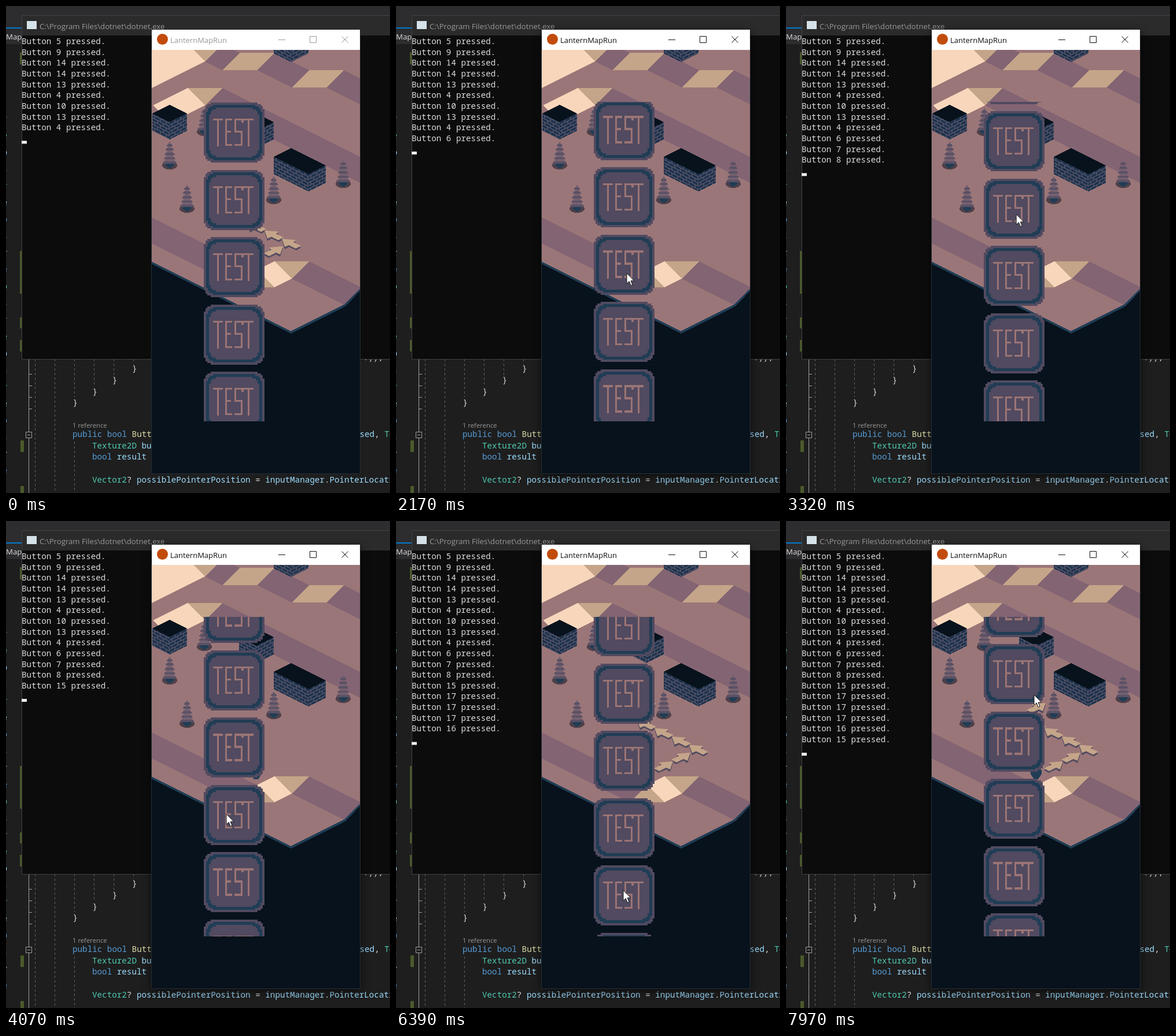
Recreate the animation shown at these times as an HTML page. Size 664 px wide and 843 px high, loop 7990 ms.

```html
<!DOCTYPE html>
<html lang="en">
<head>
<meta charset="utf-8">
<title>Scrolling button list</title>
<style>
  html, body { margin: 0; width: 100%; height: 100%; overflow: hidden; background: #1e1e1e; }
  svg { display: block; width: 664px; height: 843px; }
  text { white-space: pre; font: 14.25px "Noto Sans Mono", monospace; fill: #dcdcdc; }
  .ui { font-family: "Open Sans", sans-serif; font-size: 13.2px; }
  .kw { fill: #569cd6; }
  .type { fill: #4ec9b0; }
  .var { fill: #9cdcfe; }
  .fn { fill: #dcdcaa; }
  #terrain, #props, #list { shape-rendering: crispEdges; }
  .cream { fill: #f7d6bb; }
  .tan { fill: #c4a589; }
  .band { fill: #836473; }
  .navy { fill: #07121c; }
  .blue { fill: #203d55; }
  .slate { fill: #514a60; }
  .brick { fill: #18304a; }
  .mortar { stroke: #5f586c; stroke-width: 1.5; }
  #chrome { stroke: currentColor; fill: none; }
  #window { animation: activate 7990ms step-end infinite; }
  #shadow { filter: drop-shadow(0 4px 8px #000a); }
  #shadow, #pointer { animation: show 7990ms step-end infinite; }
  #oldTrail { animation: hide 7990ms step-end infinite; }
  #newTrail { animation: trail 7990ms step-end infinite; }
  @keyframes activate { 0% { color: #999; } 5.2%, 100% { color: #111; } }
  @keyframes show { 0% { opacity: 0; } 5.2%, 100% { opacity: 1; } }
  @keyframes hide { 0% { opacity: 1; } 5.2%, 100% { opacity: 0; } }
  @keyframes trail { 0% { opacity: 0; } 70.2%, 100% { opacity: 1; } }
</style>
</head>
<body>
<svg viewBox="0 0 664 843">
  <defs>
    <g id="brick">
      <path class="brick" d="M0 0H10V11H0Z"/>
      <path class="mortar" d="M0 1H10M0 6.5H10M2 1V6.5M7 6.5V11"/>
    </g>
    <pattern id="brickL" width="10" height="11" patternUnits="userSpaceOnUse" patternTransform="skewY(26.57)"><use href="#brick"/></pattern>
    <pattern id="brickR" width="10" height="11" patternUnits="userSpaceOnUse" patternTransform="skewY(-26.57)"><use href="#brick"/></pattern>
    <clipPath id="view"><path d="M252 76H612V809H252Z"/></clipPath>
    <clipPath id="listView"><path d="M341 166H448V719H341Z"/></clipPath>
    <g id="tree"></g>
    <g id="arrow">
      <path class="slate" d="M-16-6L8-4 5 0 17 6 9 11-4 5-11 9Z"/>
      <path class="tan" d="M-16-9L8-7 4-3 17 3 8 8-4 2-11 5Z"/>
    </g>
    <g id="button"></g>
  </defs>

  <g id="editor">
    <path fill="#1e1e1e" d="M0 0H664V843H0Z"/>
    <path fill="#2d2d30" d="M0 0H664V66H0Z"/>
    <path fill="#007acc" d="M0 37H27V39H0Z"/>
    <text class="ui" x="-8" y="58">nMap</text>
    <path fill="#4b5a2b" d="M24 80h3v21h-3ZM24 424h3v74h-3ZM24 539h3v19h-3ZM24 578h3v20h-3ZM25 752h6v20h-6ZM25 831h6v12h-6Z"/>
    <g id="fragments"></g>
    <path d="M39.5 611V737M39.5 748V843M34.5 737.5h10v10h-10ZM37 742.5h5" fill="none" stroke="#a0a0a0"/>
    <g id="guides" stroke="#626262" stroke-dasharray="4 4"></g>
    <text x="618" y="613">.));</text>
    <text class="ui" x="115" y="730" style="font-size:11.3px;fill:#9a9a9a">1 reference</text>
    <text x="115" y="746"><tspan class="kw">public bool </tspan><tspan class="fn">Button</tspan></text>
    <text x="611.5" y="746"><tspan class="var">sed</tspan>, <tspan class="type">Te</tspan></text>
    <text x="149" y="766"><tspan class="type">Texture2D </tspan><tspan class="var">button</tspan></text>
    <text x="149" y="785"><tspan class="kw">bool </tspan><tspan class="var">result</tspan></text>
    <text x="149" y="825"><tspan class="type">Vector2</tspan>? <tspan class="var">possiblePointerPosition</tspan> = <tspan class="var">inputManager</tspan>.<tspan class="var">PointerLocation</tspan></text>
  </g>

  <g id="console">
    <path fill="#0c0c0c" stroke="#424242" d="M27.5 16.5H670V611.5H27.5Z"/>
    <path fill="#2b2b2b" d="M28 17H664V51H28Z"/>
    <path fill="#d5e2e8" d="M36 26H53V40H36Z"/>
    <text class="ui" x="58" y="40" style="fill:#999">C:\Program Files\dotnet\dotnet.exe</text>
    <g id="log"></g>
    <path id="caret" fill="#f2f2f2" d="M27 65.5h9v5h-9Z"/>
  </g>

  <path id="shadow" class="navy" d="M252 41H612V809H252Z"/>
  <g id="window">
    <path fill="#fff" d="M252 41H612V76H252Z"/>
    <circle cx="270.5" cy="57.5" r="9.5" fill="#c24c0d"/>
    <text class="ui" x="284" y="64" style="font-size:13px;fill:currentColor">LanternMapRun</text>
    <path id="chrome" d="M471 58.5h12M525.5 52.5h11v11h-11ZM580.5 52.5l11 11m0-11l-11 11"/>
  </g>

  <g clip-path="url(#view)">
    <path class="navy" d="M252 76H613V810H252Z"/>
    <g id="terrain"></g>
    <g id="props"></g>
    <path class="blue" d="M423 431h19v7l-6 9h-7l-6-9Z"/>
    <g id="oldTrail"></g>
    <g id="newTrail"></g>
  </g>
  <path d="M251.5 76V809.5H612.5V41" fill="none" stroke="#252e36"/>

  <g clip-path="url(#listView)"><g id="list"></g></g>
  <path id="pointer" fill="#fff" stroke="#111" d="M0 0V18L4.2 14 7.2 21.2 10 20 7 13H12.8Z"/>
</svg>

<script>
const DURATION = 7990, PITCH = 116.5, LINE = 18.65, BUTTONS = 18;
const LIST_END = 719 - BUTTONS * PITCH + 12;
const $ = id => document.getElementById(id);
const repeat = (count, draw) => Array.from({ length: count }, (_, i) => draw(i)).join('');
const use = (id, x, y, flip = 1) => `<use href="#${id}" transform="translate(${x} ${y}) scale(${flip} 1)"/>`;
const quad = (name, x, y, ax, ay, bx, by) =>
  `<path class="${name}" d="M${x} ${y}l${ax} ${ay} ${bx} ${by} ${-ax} ${-ay}Z"/>`;

// A slope seen along a stepped edge: n tiles downhill in shade, or 0 for one lit flat piece.
function ridge(x, y, steps) {
  return steps.map(n => {
    const dx = n ? n * 30 : 60, dy = n * 15;
    const face = quad(n ? 'band' : 'tan', x, y, dx, dy, -30, 30);
    x += dx;
    y += dy;
    return face;
  }).join('');
}
const litFace = (x, y, tiles, depth = 30) => quad('cream', x, y, -30 * tiles, 15 * tiles, depth, depth);

// Isometric brick block with its left corner at x, y.
function block(x, y, left = 30, right = 30, height = 30) {
  const wall = (id, wx, wy, dx, dy) =>
    `<path fill="url(#${id})" d="M${wx} ${wy}l${dx} ${dy}v${height}l${-dx} ${-dy}Z"/>`;
  return wall('brickL', x, y, left, left / 2) + wall('brickR', x + left, y + left / 2, right, -right / 2) +
    quad('navy', x, y, left, left / 2, right, -right / 2);
}

// Rectangle with stair-stepped corners, built from overlapping bars.
const steppedRect = (inset, name) => [0, 3, 6, 12].map((dx, i, cuts) => {
  const x = inset + dx, y = inset + cuts[3 - i];
  return `<rect class="${name}" x="${x}" y="${y}" width="${105 - 2 * x}" height="${104 - 2 * y}"/>`;
}).join('');

$('button').innerHTML = steppedRect(0, 'slate') + steppedRect(4, 'blue') + steppedRect(9, 'slate') +
  `<path fill="none" stroke="#9b7474" stroke-width="3.4" d="M16 29.5h17m-8.5 0v46.5
    M49 29.5h-10.5v44h10.5m-11-23h9M67 35v-5.5h-12.5v21h11v23h-13M69 29.5h17m-8.5 0v46.5"/>`;
$('list').innerHTML = repeat(BUTTONS, i => use('button', 342, i * PITCH));

$('tree').innerHTML = `<ellipse cy="18" rx="13" ry="7" fill="#4f4049"/><path class="blue" d="M-7 13H7v6l-7 4-7-4Z"/>` +
  repeat(20, i => {
    const half = 1 + i * 0.42 + (i % 4);
    return `<rect x="${-half}" y="${i * 1.9 - 23}" width="${2 * half}" height="1.9" fill="${i % 4 > 1 ? '#5a5165' : '#75606e'}"/>`;
  });

$('terrain').innerHTML =
  '<path fill="#9b7678" stroke="#203d55" stroke-width="4" d="M245 70H625V477L586 518 493 565 245 441Z"/>' +
  ridge(314, 66, [0, 1, 0, 2, 0, 2]) + ridge(314, 142, [0, 10]) + ridge(224, 352, [7, 0]) + ridge(464, 442, [0, 3]) +
  litFace(284, 36, 4, 60) + litFace(314, 142, 2) + litFace(464, 442, 1);

$('props').innerHTML = use('tree', 343, 200) + block(463, 52) + block(252.5, 186) + block(403, 201) + block(463, 261, 60) +
  use('tree', 283, 258) + use('tree', 313, 333) + use('tree', 463, 318) + use('tree', 583, 290);

const bend = use('arrow', 463, 425, -1);
const trail = (y, count) => repeat(count, i => use('arrow', 433 + i * 30, y + i * 14.5));
$('oldTrail').innerHTML = trail(383, 3) + bend;
$('newTrail').innerHTML = use('arrow', 433, 324, -1) + trail(353, 4) + use('arrow', 493, 410, -1) + bend;

$('fragments').innerHTML = repeat(22, i => `<text class="${['kw', 'type', 'var'][i % 3]}" x="-6.5" y="${200 + i * 29}">${'reos'[i % 4]}</text>`);
$('guides').innerHTML = repeat(6, i => `<path d="M${50.5 + i * 34} 611V${i < 2 ? 843 : 715 - i * 19}"/>`) + '<path d="M118.5 754V843"/>';
$('editor').insertAdjacentHTML('beforeend', repeat(4, i =>
  `<text x="${218 - i * 34.2}" y="${632 + i * 19.8}">}</text><path d="M40 ${637.5 + i * 20}h5" stroke="#a0a0a0"/>`));

// Resting poses of the gesture, with the buttons pressed on the way to each.
const stops = [
  { time: 0, scroll: -299, x: 440, y: 300, pressed: [5, 9, 14, 14, 13, 4, 10, 13, 4] },
  { time: 2170, scroll: -304, x: 399, y: 462, pressed: [6] },
  { time: 2880, scroll: -749, x: 406, y: 221, pressed: [7, 8] },
  { time: 4070, scroll: -1291, x: 381, y: 507, pressed: [15] },
  { time: 5530, scroll: LIST_END, x: 374, y: 283, pressed: [17, 17] },
  { time: 6390, scroll: -1268, x: 393, y: 639, pressed: [17, 16] },
  { time: 7970, scroll: -1185, x: 429, y: 301, pressed: [15] }
];
const presses = stops.flatMap(({ time, pressed }, i) => {
  const start = i ? stops[i - 1].time : 0;
  return pressed.map((button, k) => ({ button, time: start + (time - start) * (k + 0.77) / pressed.length }));
});
$('log').innerHTML = presses.map(({ button }, i) => `<text x="27" y="${66 + i * LINE}">Button ${button} pressed.</text>`).join('');
const lines = [...$('log').children];
const place = (id, x, y) => $(id).setAttribute('transform', `translate(${x} ${y})`);

function render() {
  const time = performance.now() % DURATION;
  const next = Math.max(1, stops.findIndex(stop => stop.time >= time));
  const found = time > stops[stops.length - 1].time ? stops.length - 1 : next;
  const from = stops[found - 1], to = stops[found];
  const u = Math.min(1, (time - from.time) / (to.time - from.time));
  const ease = u * u * (3 - 2 * u);
  const mix = key => from[key] + (to[key] - from[key]) * ease;
  const drag = 70 * Math.sin(2 * Math.PI * u);

  place('list', 0, Math.max(LIST_END, mix('scroll') + drag));
  place('pointer', mix('x'), mix('y') + drag);
  const shown = presses.filter(press => press.time <= time).length;
  lines.forEach((line, i) => line.setAttribute('visibility', i < shown ? 'visible' : 'hidden'));
  place('caret', 0, shown * LINE);
  requestAnimationFrame(render);
}
render();
</script>
</body>
</html>
```
